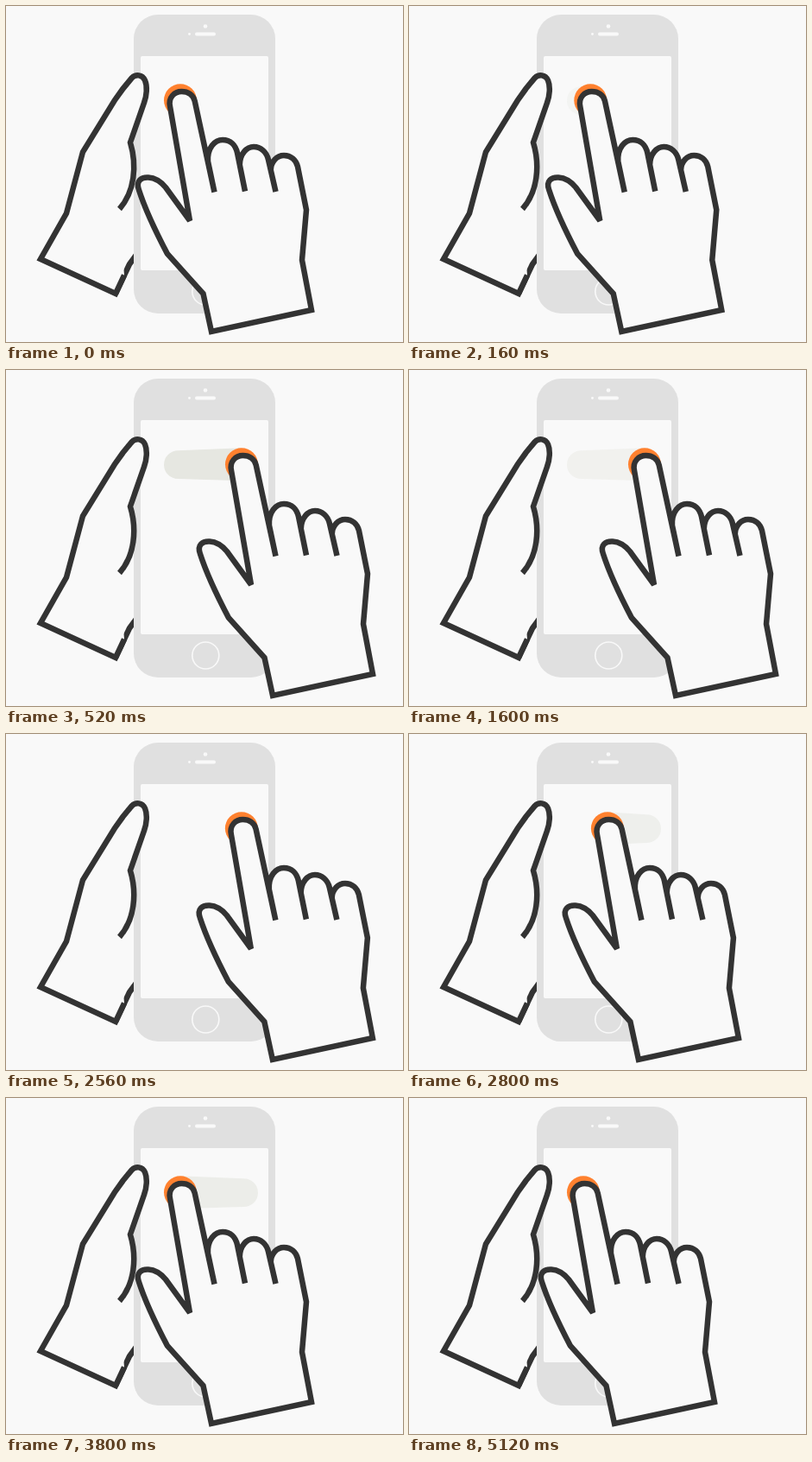
Recreate the animation shown at these times as an HTML page. Size 460 by 389 pixels, loop 5480 ms.

```html
<!DOCTYPE html>
<html lang="en">
<head>
<meta charset="utf-8">
<title>Swipe gesture</title>
<style>
  html, body { margin: 0; width: 100%; height: 100%; overflow: hidden; background: #f9f9f9; }
  svg { display: block; }
  .outline { fill: #f9f9f9; stroke: #333; stroke-width: 6.5; }
  .light { fill: #f9f9f9; }
</style>
</head>
<body>
<svg width="460" height="389" viewBox="0 0 460 389">
  <path class="outline" d="M127 333 L143 299 L154 284"/>

  <rect x="148" y="10" width="164" height="346" rx="28" fill="#e0e0e0"/>
  <rect class="light" x="156" y="58" width="148" height="248" rx="2"/>
  <circle class="light" cx="231" cy="23.5" r="2.3"/>
  <circle class="light" cx="212.5" cy="32.5" r="1.4"/>
  <rect class="light" x="219" y="30.5" width="24" height="4" rx="2"/>
  <circle cx="231.3" cy="330.5" r="15.5" fill="none" stroke="#f9f9f9" stroke-width="1.6"/>

  <path class="outline" d="M131.5 235 C149 215 152 185 144 158 L160 112
    C163 104 164 93 161 86 C158 79 150 79 146 83 C139 91 132 100 126 109
    L89 169 L70 240 L40 293 L127 333 L137 311.7"/>

  <path id="trail" fill="#e6e7e1"/>
  <g id="pointer">
    <circle cx="202" cy="109.2" r="19" fill="#ff812f"/>
    <path class="outline" d="M213 248.5 L190 116 C188 106 195 99 203.5 99 C211 99 217 103 218.7 110
      L241.5 215.5 L234 180 C233 164 242 155 251 155 C260 155 266 161 268 170
      L277 214.5 L270.8 184 C271 171 279 163 287 163 C295 163 302 169 304 178
      L312.5 215 L306.8 190 C307 180 314 173 322 173 C330 173 336 178 338 186
      L348 236 L343 294 L354 352 L238 377 L228.5 333 L187 287
      C177 268 163 241 154 213 C150 202 157 198 165 198.5 C173 199 180 204 185 210 Z"/>
  </g>
</svg>
<script>
const LOOP = 5480, STEP = 40, SWIPE = 520, FADE = 2000, DISTANCE = 71;
const START_X = 202, TOUCH_Y = 109.2, TOUCH_R = 19, TAIL_R = 16.4;
const trail = document.getElementById('trail');
const pointer = document.getElementById('pointer');

const clamp = v => Math.max(0, Math.min(1, v));
const easeInOutCubic = p => p < 0.5 ? 4 * p ** 3 : 1 - 4 * (1 - p) ** 3;

// Rounded tail where the swipe began, widening towards the finger.
function trailPath(from, to, dir) {
  const tail = from - dir * (TOUCH_R - TAIL_R);
  const y = TOUCH_Y + 0.5;
  return `M${to} ${TOUCH_Y - TOUCH_R} L${tail} ${y - TAIL_R}
    A${TAIL_R} ${TAIL_R} 0 0 ${dir > 0 ? 0 : 1} ${tail} ${y + TAIL_R}
    L${to} ${TOUCH_Y + TOUCH_R} Z`;
}

function render(time) {
  const t = Math.floor((time % LOOP) / STEP) * STEP;
  const half = SWIPE + FADE;
  const forward = t < half;
  const local = forward ? t : t - half;
  const dir = forward ? 1 : -1;
  const from = START_X + (forward ? 0 : DISTANCE);
  const to = from + dir * DISTANCE * easeInOutCubic(clamp(local / SWIPE));
  const opacity = local < SWIPE ? local / SWIPE : 1 - clamp((local - SWIPE) / FADE);

  pointer.setAttribute('transform', `translate(${to - START_X} 0)`);
  trail.setAttribute('d', trailPath(from, to, dir));
  trail.setAttribute('opacity', opacity);
}

const begin = performance.now();
function tick() {
  render(performance.now() - begin);
  requestAnimationFrame(tick);
}
tick();
</script>
</body>
</html>
```
